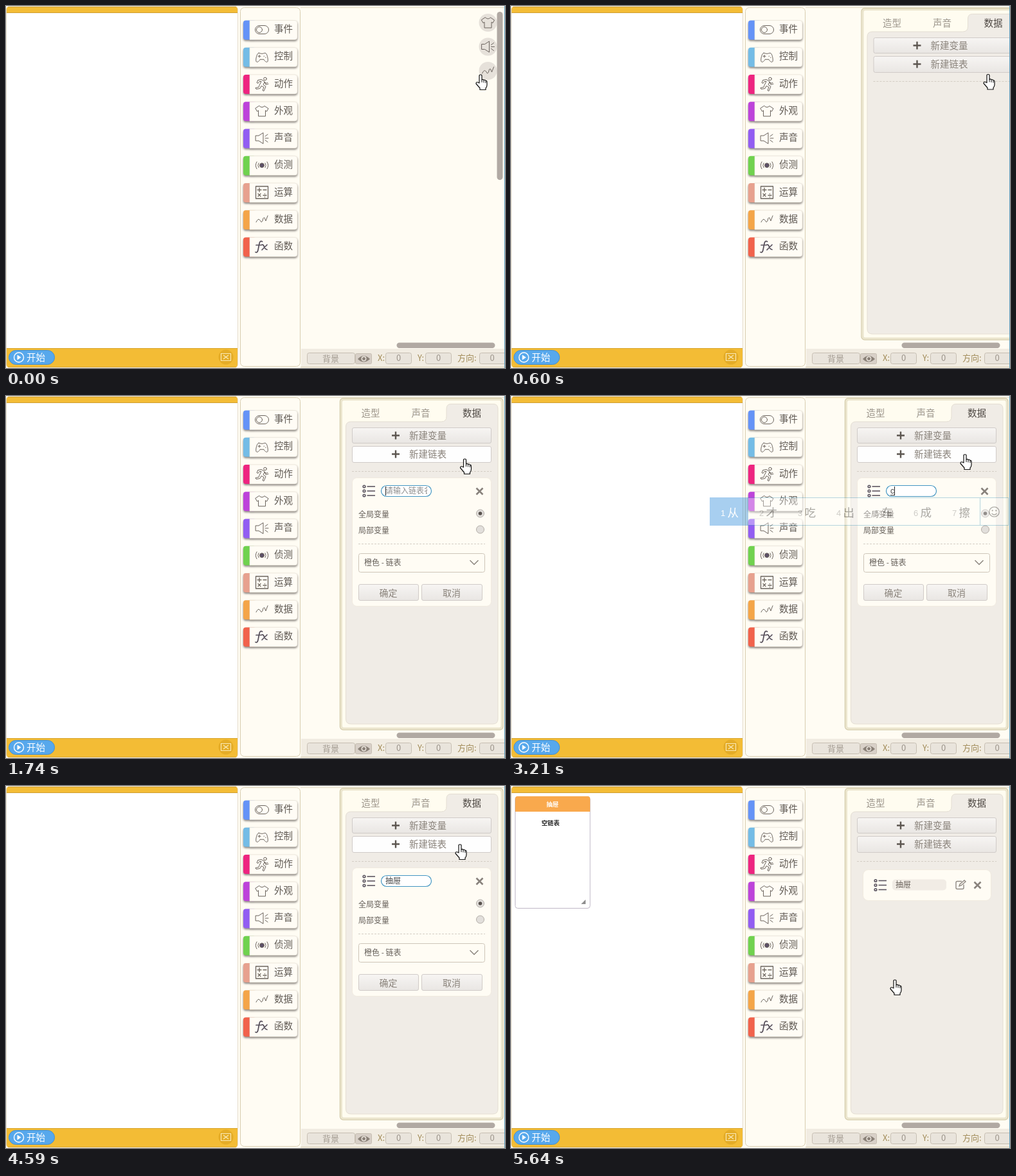
An HTML page for the animation above (5.67 s loop, 776 by 564 pixels).

```html
<!DOCTYPE html>
<html lang="zh-CN">
<head>
<meta charset="utf-8">
<title>新建链表</title>
<style>
html, body { margin: 0; width: 100%; height: 100%; overflow: hidden; background: #fffcf3; }
svg { display: block; font-family: 'Noto Sans CJK SC', 'Noto Sans CJK', 'Noto Sans', sans-serif; }
.latin { font-family: 'Liberation Sans', Arial, sans-serif; }
.icon { fill: none; stroke: #6a635d; stroke-width: 1; stroke-linejoin: round; stroke-linecap: round; }
.list { fill: none; stroke: #5a5460; stroke-width: 1.6; }
.block { filter: drop-shadow(0 2px 1.5px #8a8580); }
</style>
</head>
<body>
<svg id="stage" width="776" height="564" viewBox="0 0 776 564"></svg>
<script>
const LOOP = 5670;
const stage = document.getElementById('stage');

const rect = (x, y, w, h, r, fill, stroke = 'none', extra = '') =>
  `<rect x="${x}" y="${y}" width="${w}" height="${h}" rx="${r}" fill="${fill}" stroke="${stroke}" ${extra}/>`;
const text = (x, y, size, fill, str, extra = '') =>
  `<text x="${x}" y="${y}" font-size="${size}" fill="${fill}" ${extra}>${str}</text>`;
const path = (d, stroke, width = 1, extra = 'fill="none"') =>
  `<path d="${d}" stroke="${stroke}" stroke-width="${width}" ${extra}/>`;
const group = (x, y, body, extra = '') => `<g transform="translate(${x} ${y})" ${extra}>${body}</g>`;
const dashes = (x1, x2, y) => path(`M${x1} ${y}H${x2}`, '#d3cdc4', 1, 'fill="none" stroke-dasharray="3 2"');
const cross = (x, y) => path(`M${x - 5} ${y - 5}l10 10m0 -10l-10 10`, '#88827c', 2.6);
const MIDDLE = 'text-anchor="middle"';

// Icons are drawn around their own centre.
const icons = {
  toggle: '<rect x="-10.5" y="-6.5" width="21" height="13" rx="6.5"/><circle cx="-4" r="4.5"/>',
  pad: '<path d="M-5 -6C-8 -6 -10 4 -9 7C-8 9 -5 8 -3 4H3C5 8 8 9 9 7C10 4 8 -6 5 -6C3 -6 3 -5 0 -5S-3 -6 -5 -6ZM-6 -1h4m-2 -2v4M3 -1h.5M5.5 1h.5"/>',
  runner: '<circle cx="5" cy="-8" r="2.3"/><path d="M-6 -6L-1 -7L4 -4L6 -1L9 -2M-6 -6L-8 -2L-6 -1L-4 -4L-1 -4L-4 2L-5 5L-10 6L-9 8L-3 7L-1 3L3 5L1 10L3 11L6 4L2 1L4 -3L6 1L10 0"/>',
  shirt: '<path d="M-4 -8Q0 -4 4 -8L10 -4L7.5 .5L5.5 -1V8H-5.5V-1L-7.5 .5L-10 -4Z"/>',
  speaker: '<path d="M-9.5 -4H-5L2 -8.5V8.5L-5 4H-9.5ZM5 -3L9 -6M5 0H10M5 3L9 6"/>',
  sense: '<circle r="3.4" fill="#5c5068"/><path d="M-5 -3.5Q-7.5 0 -5 3.5M5 -3.5Q7.5 0 5 3.5M-8 -5.5Q-11.5 0 -8 5.5M8 -5.5Q11.5 0 8 5.5"/>',
  math: '<path d="M-9.5 -9.5H9.5V9.5H-9.5ZM-7 -4H-1M-4 -7V-1M2 -4H7M-6 2l4 4m0 -4l-4 4M2 4.5H7M4.5 2v.3M4.5 7v.3" stroke-width="1.3"/>',
  data: '<path d="M-9 4Q-6 -2 -4 0T-1 4Q1 4 2 -2Q4 -5 5 0L6 2L9 -6"/>',
  fx: '<path d="M-10 8.500Q-7 10 -6 5L-4 -5Q-3 -10 .500 -8M-9 -2.500H-1M0 -3Q2 -4 3.500 0T8 4.500M8 -3L0 5" stroke="#554e5a" stroke-width="1.7"/>'
};
const icon = (name, x, y) => group(x, y, icons[name], 'class="icon"');

const listIcon = (x, y) => group(x, y, [-7, 0, 7].map(d =>
  `<circle cx="-7" cy="${d}" r="1.8"/><path d="M-2.500 ${d}H10"/>`).join(''), 'class="list"');

const blocks = [
  ['#6593f7', 'toggle', '事件'], ['#74bce6', 'pad', '控制'], ['#ee2580', 'runner', '动作'],
  ['#bd43da', 'shirt', '外观'], ['#925df2', 'speaker', '声音'], ['#70d24e', 'sense', '侦测'],
  ['#e7a18e', 'math', '运算'], ['#f4a548', 'data', '数据'], ['#f1624b', 'fx', '函数']
];

function palette() {
  return rect(364.5, 2.5, 93, 559, 6, '#fffcf3', '#d8cdb0') + blocks.map(([color, name, label], i) => {
    const y = 37.5 + i * 42.25;
    return `<g class="block">${rect(369, y - 15, 20, 30, 4, color)}
      <path d="M379 ${y - 15}h70q4 0 4 4v22q0 4 -4 4h-70z" fill="#fffcf5" stroke="#e8e1d6" stroke-width=".6"/></g>`
      + icon(name, 398, y - .5) + text(417, y + 3.5, 14.5, '#5f5953', label);
  }).join('');
}

function playArea() {
  return rect(0.5, 1, 360, 562, 5, '#fff', '#e4dccb')
    + '<path d="M1 11V5Q1 1 5 1H356Q360 1 360 5V11Z" fill="#f4bd37"/>' + path('M1 10.5H360M3 1.5H358', '#cf9f35')
    + '<path d="M1 533H360V559Q360 563 356 563H5Q1 563 1 559Z" fill="#f3bc35"/>' + path('M1 533.5H360M3 562.5H358', '#d9a52d')
    + rect(4.5, 536.5, 71, 22, 11, '#57a8ec', '#418fd2')
    + '<circle cx="20" cy="547.5" r="7.5" fill="none" stroke="#fff" stroke-width="1.4"/><path d="M17.5 543.5v8l6 -4z" fill="#fff"/>'
    + text(32, 552.5, 14.5, '#fff', '开始')
    + '<circle cx="342" cy="547" r="11.5" fill="#e4ac27"/>'
    + path('M334.5 541.5h15v11h-15zM338 544l8 6m0 -6l-8 6', '#fae9b4', 1.2);
}

function workspace() {
  const field = (x, w) => rect(x + .5, 540.5, w, 17, 3, '#e9e4dc', '#c6beb2');
  const label = (x, str) => text(x, 553, 13, '#a18b58', str);
  const zero = x => text(x, 553, 13, '#9a9288', '0', MIDDLE);
  return path('M458 2.5H776', '#e0d8c0') + rect(459, 534, 317, 28, 0, '#f1ece2') + path('M458 562.5H776', '#d8cdb0')
    + field(468, 74) + text(505, 553.5, 13, '#a0988e', '背景', MIDDLE)
    + rect(543.5, 541.5, 25, 16, 2, '#d8d0c8', '#c6beb2')
    + '<path d="M547 550Q556 540 566 550Q556 559 547 550Z" fill="#8a8178"/><circle cx="556.5" cy="549.5" r="3.2" fill="#8a8178" stroke="#eee8e0" stroke-width="1.4"/>'
    + label(578, 'X:') + field(590, 40) + zero(610.5) + label(640, 'Y:') + field(652, 40) + zero(672.5)
    + label(702, '方向:') + field(736, 50) + zero(756)
    + ['shirt', 'speaker', 'data'].map((name, i) =>
      `<circle cx="749.5" cy="${26 + i * 37.5}" r="14" fill="#e6e1da"/>` + icon(name, 749.5, 26 + i * 37.5)).join('')
    + rect(763.5, 9, 9, 262, 4.5, '#b1a9a3') + rect(607.5, 524.5, 153, 8.5, 4.2, '#b1a9a3');
}

const button = (x, y, w, h, id = '') => rect(x + .5, y + .5, w, h, 2.5, 'url(#face)', '#d0cbc8', id && `id="${id}"`);

function form() {
  const radio = (y, on) => `<circle cx="737.5" cy="${y}" r="6" fill="#e2dfdb" stroke="#b3ada7"/>`
    + (on ? `<circle cx="737.5" cy="${y}" r="2.8" fill="#57514c"/>` : '');
  return `<g id="form">` + rect(538.5, 127.5, 216, 200, 7, '#fffcf4', '#f0eadf')
    + listIcon(564, 148) + rect(583.5, 139.5, 78, 17, 8.5, '#fff', '#4295c2', 'stroke-width="1.2"')
    + '<g clip-path="url(#inputClip)"><text id="entry" x="590" y="152" font-size="12"></text></g>'
    + '<path id="underline" stroke="#333"/><path id="caret" stroke="#222"/>'
    + cross(736.5, 148.5)
    + text(548, 188.5, 12, '#645e58', '全局变量') + radio(183, true)
    + text(548, 213.5, 12, '#645e58', '局部变量') + radio(208, false)
    + dashes(548, 745, 230.5)
    + rect(548.5, 245.5, 196, 29, 3, '#fffcf4', '#cdc5b8') + text(557, 264, 12, '#645e58', '橙色 - 链表')
    + path('M721.5 256l6.5 6.5l6.5 -6.5', '#8b857e', 1.5)
    + button(548, 293, 93, 25, 'confirm') + text(594.5, 311.5, 14, '#8a837b', '确定', MIDDLE)
    + button(646, 293, 94, 25) + text(693, 311.5, 14, '#8a837b', '取消', MIDDLE) + '</g>';
}

function savedItem() {
  return '<g id="saved">' + rect(547.5, 130.5, 199, 48, 8, '#fffcf4', '#f0eadf') + listIcon(574, 154.5)
    + rect(593, 145.5, 84, 17, 5, '#f1ece5') + text(598, 158, 12, '#68615a', '抽屉')
    + path('M701 148.5h-7q-2 0 -2 2v8q0 2 2 2h8q2 0 2 -2v-5M697 156l1 -3l7 -6l2 2l-7 6z', '#8f8983', 1.4)
    + cross(725.5, 154.5) + '</g>';
}

function panel() {
  const plus = y => path(`M600 ${y}h12m-6 -6v12`, '#5c5650', 2.4);
  return '<g id="panel">' + rect(519.5, 3.5, 253.5, 516.5, 5, '#fffcf0', '#d4cbaa', 'stroke-width="1.4"')
    + rect(521.5, 5.5, 249.5, 512.5, 4, 'none', '#ebe5cd', 'stroke-width="3"')
    + '<path d="M528.500 503V48Q528.500 40 536.500 40H677Q685 40 685 32V20Q685 12.500 692 12.500H758Q765 12.500 765 20V503Q765 511 757 511H536.500Q528.500 511 528.500 503Z" fill="#f0ece6" stroke="#e4ded3"/>'
    + text(552.5, 32, 14.5, '#9c958b', '造型') + text(630.5, 32, 14.5, '#9c958b', '声音') + text(710, 32, 14.5, '#4f4944', '数据')
    + button(538, 49, 216, 24) + plus(61.5) + text(627, 67, 14.5, '#8a837b', '新建变量')
    + button(538, 78, 216, 25, 'newList') + plus(90.5) + text(627, 96, 14.5, '#8a837b', '新建链表')
    + dashes(538, 755, 117.5) + form() + savedItem() + '</g>';
}

function stageList() {
  return '<g id="stageList">' + rect(6.5, 16.5, 116.5, 174, 4, '#fff', '#bfb7c6')
    + '<path d="M6.500 40V20Q6.500 16 10.500 16H119Q123 16 123 20V40Z" fill="#f9a94d"/>'
    + text(64.5, 32, 9.5, '#fff', '抽屉', MIDDLE + ' font-weight="700"')
    + text(61.5, 61, 9.3, '#222', '空链表', MIDDLE + ' font-weight="700"')
    + '<path d="M116 177v7h-7z" fill="#8e8e8e"/></g>';
}

const hand = `<path d="M-2 13V2Q-2 0 0 0T2 2V8Q4 6.500 5 8.500Q7 7.500 8 9.500Q10 9 10 11.500V16Q10 19 8 21V23.500H-1V21L-7 14Q-7 11 -4 12Z"
  fill="#fff" stroke="#111" stroke-width="1.2" stroke-linejoin="round"/>` + path('M2 8v4M5 9v3.500M8 10v3', '#111');

stage.innerHTML = `<defs>
  <linearGradient id="face" x2="0" y2="1"><stop stop-color="#f7f5f3"/><stop offset="1" stop-color="#e9e6e3"/></linearGradient>
  <clipPath id="inputClip"><rect x="588" y="139" width="67" height="18"/></clipPath></defs>`
  + rect(0, 0, 776, 564, 0, '#fffcf3') + playArea() + stageList() + palette() + workspace() + panel()
  + path('M775.5 0V564', '#5f9fc0') + '<g id="ime"></g>' + `<g id="cursor">${hand}</g>`;

const el = Object.fromEntries([...stage.querySelectorAll('[id]')].map(node => [node.id, node]));

// Input method: time, composed letters, candidates.
const keystrokes = [
  [3180, 'c', '从 才 吃 出 车 成 擦'],
  [3270, 'ch', '吃 出 车 成 长 超 处'],
  [3330, 'cho', '抽 冲 虫 丑 愁 臭 宠'],
  [3420, 'chou', '抽 丑 臭 愁 仇 筹 绸'],
  [3510, "chou't", '抽屉 抽提 抽调 抽头 丑态 臭头 抽痛'],
  [3570, "chou'ti", '抽屉 抽提 抽 丑 臭 愁 仇']
];
const COMMIT = 3990, FORM_OPEN = 1440, SAVE = 5190;

function candidateBar(words) {
  const widths = words.map(word => 42.6 + 17.4 * word.length);
  const left = 729 - widths.reduce((a, b) => a + b);
  let x = left;
  const cells = words.map((word, i) => {
    const cell = text(x + 17, 186.5, 13, i ? '#777' : '#fff', i + 1, 'class="latin"')
      + text(x + 27.5, 187.5, 17.5, i ? '#111' : '#fff', word);
    x += widths[i];
    return cell;
  }).join('');
  return rect(left + .5, 158.5, 773 - left, 43, 0, '#fff', '#2f8fb8')
    + rect(left, 158, widths[0], 44, 0, '#0c79d5') + cells + path('M729.5 158V202', '#2f8fb8')
    + '<circle cx="751.5" cy="180.5" r="7.7" fill="none" stroke="#222" stroke-width="1.3"/>'
    + path('M747.500 183q4 4 8 0', '#222', 1.2)
    + '<circle cx="748.700" cy="178.500" r="1.1"/><circle cx="754.300" cy="178.500" r="1.1"/>';
}
keystrokes.forEach(key => key.push(candidateBar(key[2].split(' '))));

const clamp = v => Math.min(1, Math.max(0, v));
const swing = (t, from, to) => .5 - Math.cos(Math.PI * clamp((t - from) / (to - from))) / 2;
const show = (node, on) => node.setAttribute('visibility', on ? 'inherit' : 'hidden');
const within = (t, from, to) => t >= from && t < to;

// Pointer moves: start, end, x, y.
const moves = [[20, 120, 742, 106.5], [890, 1140, 713.5, 98], [1740, 2010, 706, 91], [4650, 4980, 597, 302]];
function pointer(t) {
  let x = 738, y = 107;
  for (const [from, to, nx, ny] of moves) {
    const k = swing(t, from, to);
    x += (nx - x) * k;
    y += (ny - y) * k;
  }
  return [x, y];
}

function drawEntry(t) {
  const key = keystrokes.findLast(k => t >= k[0]);
  const composing = key && t < COMMIT;
  const content = !key ? '请输入链表名' : composing ? key[1] : '抽屉';
  if (el.entry.textContent !== content) el.entry.textContent = content;
  el.entry.setAttribute('fill', key ? '#444' : '#8d8d8d');
  el.entry.setAttribute('class', composing ? 'latin' : '');
  const end = 590 + (key ? el.entry.getComputedTextLength() : 0);
  el.underline.setAttribute('d', `M590 154.5H${end}`);
  show(el.underline, composing);
  el.caret.setAttribute('d', `M${Math.round(end) + .5} 141V155`);
  show(el.caret, within(t, FORM_OPEN, 1920) || within(t, 2460, 2970) || within(t, 3180, 4530));

  const fade = Math.min(clamp((t - 3165) / 130), clamp(1 - (t - COMMIT + 30) / 90));
  if (key && el.ime.word !== key[1]) {
    el.ime.innerHTML = key[3];
    el.ime.word = key[1];
  }
  el.ime.setAttribute('opacity', fade);
  show(el.ime, fade > 0);
}

function draw(t) {
  const [x, y] = pointer(t);
  el.cursor.setAttribute('transform', `translate(${x} ${y})`);
  el.panel.setAttribute('transform', `translate(${260 * (1 - swing(t, 255, 689))} 0)`);
  show(el.panel, t >= 255);
  show(el.form, within(t, FORM_OPEN, SAVE));
  show(el.saved, t >= SAVE);
  show(el.stageList, t >= SAVE);
  const pressed = within(t, 1380, FORM_OPEN);
  el.newList.setAttribute('fill', pressed ? '#e4e1de' : y < 104 ? '#fefefe' : 'url(#face)');
  el.confirm.setAttribute('fill', t >= 5040 ? '#e4e1de' : y > 293 ? '#fefefe' : 'url(#face)');
  drawEntry(t);
}

const start = performance.now();
function tick() {
  draw((performance.now() - start) % LOOP);
  requestAnimationFrame(tick);
}
tick();
</script>
</body>
</html>
```
